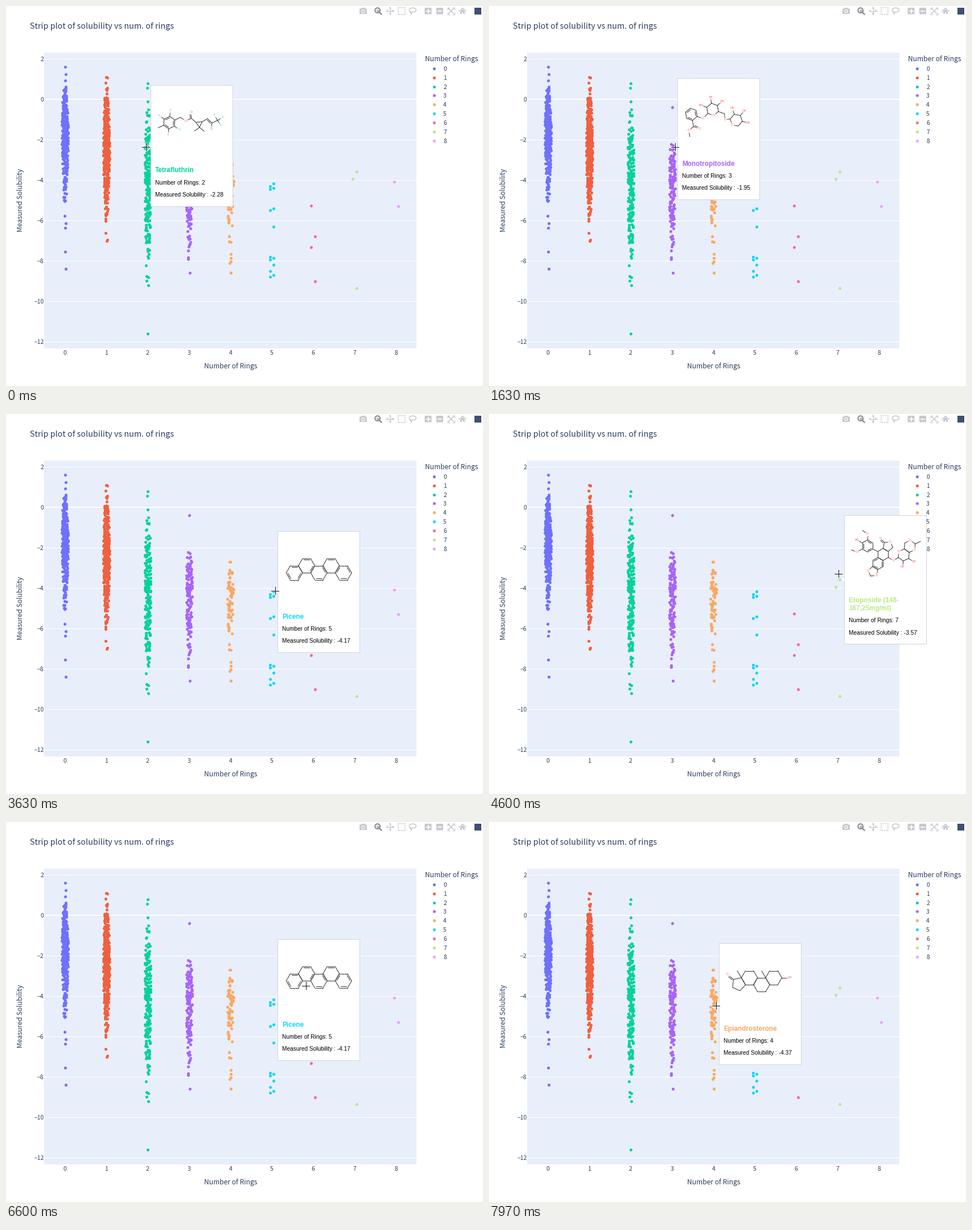
A matplotlib script for the animation above (8000 ms loop, 838x668 px).

```python
import numpy as np
import matplotlib.pyplot as plt
from matplotlib.animation import FuncAnimation
from matplotlib.collections import LineCollection
from matplotlib.patches import Circle, Ellipse, FancyBboxPatch, Polygon, Rectangle

W, H, DPI = 838, 668, 64
PT = 72 / DPI  # points per pixel
STEP, LOOP = 40, 8000

INK, PAPER = "#2a3f5f", "#e8eefa"
ICON, ICON_ON = "#c8cacd", "#868a92"
COLORS = ["#6f71fb", "#f0603f", "#06d29b", "#a964f6", "#f9a962",
          "#14d6f4", "#f46c96", "#bbe985", "#f49ff5"]
ATOM_INK = {"": "#2b2b2b", "O": "#f0524f", "OH": "#f0524f", "HO": "#f0524f",
            "F": "#4fc9c4", "Cl": "#5fc46a"}
SANS, ARIAL, SERIF = "Noto Sans CJK JP", "Liberation Sans", "Liberation Serif"

fig = plt.figure(figsize=(W / DPI, H / DPI), dpi=DPI, facecolor="white")
ax = fig.add_axes([0, 0, 1, 1])
ax.set(xlim=(0, W), ylim=(H, 0))
ax.axis("off")


def text(x, y, s, size, color=INK, family=SANS, ha="left", va="baseline", **kw):
    return ax.text(x, y, s, fontsize=size * PT, color=color, family=family,
                   ha=ha, va=va, **kw)


def line(xs, ys, color, lw, **kw):
    return ax.plot(xs, ys, color=color, lw=lw * PT, **kw)[0]


def dots(xs, ys, k):
    ax.plot(xs, ys, "o", ms=5.1 * PT, mew=0, color=COLORS[k])


def x_at(k):
    return 103.5 + 72.7 * k


def y_at(v):
    return 164 - 35.5 * v


# ---- chart ----------------------------------------------------------------

def draw_axes():
    ax.add_patch(Rectangle((67, 82), 654, 520, fc=PAPER, ec="none"))
    for v in range(2, -13, -2):
        line([67, 721], [y_at(v)] * 2, "white", 1 if v else 2)
        text(66.5, y_at(v) + 4, str(v).replace("-", "\u2212"), 10.4, ha="right")
    for k in range(9):
        y = 109.6 + 15.95 * k
        text(x_at(k), 613, str(k), 10.4, ha="center")
        text(771, y + 4, str(k), 10.4, ha="center")
        dots([751.5], [y], k)
    text(42, 40, "Strip plot of solubility vs num. of rings", 14.3)
    text(394.5, 637, "Number of Rings", 12, ha="center")
    text(736.5, 97, "Number of Rings", 12)
    text(25.5, 341, "Measured Solubility", 12, ha="center", va="center", rotation=90)


# Crowded columns: count, mode, spread above and below it, highest, lowest
STRIPS = [
    (330, -1.4, 1.0, 1.7, 1.6, -8.4),
    (390, -2.4, 1.4, 1.6, 1.1, -7.0),
    (210, -3.4, 1.4, 2.5, 0.8, -9.2),
    (140, -4.0, 1.1, 1.7, -0.4, -8.6),
    (72, -4.1, 0.7, 1.6, -2.7, -8.6),
]
# Thin columns, from the highest dot to the lowest
SINGLES = {
    5: (-4.17, -4.3, -4.4, -4.45, -5.4, -5.5, -6.3, -7.8, -7.85, -7.95,
        -8.2, -8.5, -8.7, -8.8),
    6: (-5.27, -6.8, -7.32, -9.02),
    7: (-3.57, -3.93, -9.34),
    8: (-4.08, -5.3),
}


def draw_points():
    rng = np.random.default_rng(11)
    for k, (n, mode, up, down, top, low) in enumerate(STRIPS):
        z = np.abs(rng.normal(size=2 * n))
        above = rng.random(2 * n) < up / (up + down)
        v = mode + np.where(above, up * z, -down * z)
        keep = (v < top) & (v > low)
        v, z = v[keep][:n], z[keep][:n]
        # the jitter is wide where the column is crowded
        reach = np.maximum(1.8, 5.6 * np.exp(-z**2 / 5))
        dots(x_at(k) + reach * rng.uniform(-1, 1, len(v)), y_at(v), k)
        dots([x_at(k), x_at(k) + 1], [y_at(top), y_at(low)], k)
    dots([x_at(2) + 0.5], [y_at(-11.6)], 2)
    for k, values in SINGLES.items():
        for i, v in enumerate(values):
            side = 1 if (i + k) % 2 else -1
            dots([x_at(k) + 3.4 * side], [y_at(v)], k)


def draw_toolbar():
    def box(x, y, w, h, r=1):
        ax.add_patch(FancyBboxPatch((x + r, y + r), w - 2 * r, h - 2 * r, fc=ICON,
                                    ec="none", boxstyle=f"round,pad={r}"))

    def plus(x, y, r, color, lw):
        line([x - r, x + r], [y, y], color, lw)
        line([x, x], [y - r, y + r], color, lw)

    # camera
    box(621, 4.5, 13, 9.5)
    box(624.5, 3, 6, 4)
    for r, color in ((3.2, "white"), (1.9, ICON)):
        ax.add_patch(Circle((627.5, 9.2), r, fc=color, ec="none"))
    # zoom
    ax.add_patch(Circle((652.7, 7.7), 4.4, fc="none", ec=ICON_ON, lw=2 * PT))
    line([656, 659.5], [11, 14.5], ICON_ON, 2.4)
    plus(652.7, 7.7, 2, ICON_ON, 1.2)
    # pan
    plus(674.5, 8.5, 6, ICON, 1.4)
    for d in np.array([(1, 0), (-1, 0), (0, 1), (0, -1)]):
        tip, side = (674.5, 8.5) + 7 * d, 2.6 * d[::-1]
        ax.add_patch(Polygon([tip, tip - 3 * d + side, tip - 3 * d - side], fc=ICON, ec="none"))
    # box and lasso select
    ax.add_patch(Rectangle((688.5, 2.5), 12, 12, fc="none", ec=ICON, lw=1.8 * PT,
                           ls=(0, (1.1, 0.9))))
    ax.add_patch(Ellipse((714.5, 7), 12, 7.5, fc="none", ec=ICON, lw=1.6 * PT))
    line([710.5, 710, 712.5, 711.5], [9.8, 12, 12.5, 15], ICON, 1.4)
    # zoom in, zoom out
    box(735.5, 3, 12, 11.5)
    box(756, 3, 12, 11.5)
    plus(741.5, 8.7, 3, "white", 1.8)
    line([759, 765], [8.7, 8.7], "white", 1.8)
    # autoscale
    for sx in (-1, 1):
        line([778, 786], [8.7 - 4 * sx, 8.7 + 4 * sx], ICON, 1.5)
        for sy in (-1, 1):
            cx, cy = 782 + 6 * sx, 8.7 + 6 * sy
            line([cx - 3 * sx, cx, cx], [cy, cy, cy - 3 * sy], ICON, 1.4)
    # home
    line([796, 802, 808], [9, 3.5, 9], ICON, 1.5)
    ax.add_patch(Polygon([(798, 9), (802, 5.5), (806, 9), (806, 14), (798, 14)],
                         fc=ICON, ec="none"))
    ax.add_patch(Rectangle((801, 10.5), 2, 3.5, fc="white", ec="none"))

    ax.add_patch(Rectangle((823, 3), 12, 12, fc="#3f4f75", ec="none"))


# ---- molecules ------------------------------------------------------------

def polar(r, deg):
    a = np.radians(deg)
    return np.stack([r * np.cos(a), r * np.sin(a)], axis=-1)


class Molecule:
    """Structure grown from regular rings and arms of one bond length."""

    def __init__(self, size):
        self.size = size
        self.segs, self.inks, self.labels = [], [], []

    def stroke(self, p, q, ink=""):
        self.segs.append([p, q])
        self.inks.append(ATOM_INK[ink])

    def link(self, p, q, a="", b=""):
        """Bond whose halves take the colours of atoms a and b."""
        mid, trim = (p + q) / 2, 0.32 * (q - p)
        self.stroke(p + trim * bool(a), mid, a)
        self.stroke(mid, q - trim * bool(b), b)

    def double(self, p, q, toward):
        """Second stroke of a double bond, on the side of `toward`."""
        d = q - p
        n = np.array([-d[1], d[0]]) / np.hypot(*d)
        n *= 2.2 * np.sign(n @ (toward - p))
        self.stroke(p + 0.15 * d + n, q - 0.15 * d + n)

    def tag(self, at, label):
        if label:
            self.labels.append((at, label))

    def polygon(self, v, oxygens=(), doubles=()):
        names = ["O" if k in oxygens else "" for k in range(len(v))]
        for k, p in enumerate(v):
            j = (k + 1) % len(v)
            self.link(p, v[j], names[k], names[j])
            self.tag(p, names[k])
            if k in doubles:
                self.double(p, v[j], v.mean(axis=0))
        return v

    def ring(self, x, y, turn=0, **kw):
        return self.polygon((x, y) + polar(self.size, turn + 60 * np.arange(6)), **kw)

    def fuse(self, v, k, n, **kw):
        """Regular n-gon grown outwards on edge k of ring v."""
        pts = [v[(k + 1) % len(v)], v[k]]
        step = pts[1] - pts[0]
        heading = np.degrees(np.arctan2(step[1], step[0]))
        while len(pts) < n:
            heading += 360 / n
            pts.append(pts[-1] + polar(self.size, heading))
        return self.polygon(np.array(pts), **kw)

    def arm(self, p, deg, label="", start="", double=False):
        q = p + polar(self.size, deg)
        self.link(p, q, start, label)
        self.tag(q, label)
        if double:
            self.double(p, p + 0.8 * (q - p), p + polar(1, deg - 90))
        return q

    def out(self, v, k, label="", **kw):
        dx, dy = v[k] - v.mean(axis=0)
        return self.arm(v[k], np.degrees(np.arctan2(dy, dx)), label, **kw)

    def artists(self):
        strokes = LineCollection(self.segs, colors=self.inks, linewidths=0.95 * PT,
                                 capstyle="round", zorder=12)
        ax.add_collection(strokes)
        return [strokes] + [text(x, y, s, 5, ATOM_INK[s], ARIAL, "center", "center",
                                 zorder=13) for (x, y), s in self.labels]


def tetrafluthrin():
    m = Molecule(10.9)
    v = m.ring(286.8, 205, -25, doubles=(0, 2, 4))
    for k in (1, 2, 4, 5):
        m.out(v, k, "F")
    m.out(v, 3)
    oxygen = m.arm(m.out(v, 0), 35, "O")
    acid = m.arm(oxygen, -25, start="O")
    m.arm(acid, -90, "O", double=True)
    a = m.arm(acid, 40)
    b = a + polar(m.size, -5)
    c = a + polar(m.size, 55)
    m.polygon(np.array([a, b, c]))
    m.arm(c, 145)
    m.arm(c, 40)
    d = m.arm(b, -30)
    e = m.arm(d, 45)
    m.double(d, e, a)
    m.arm(e, 95, "Cl")
    f = m.arm(e, -25)
    for deg in (-120, -30, 55):
        m.arm(f, deg, "F")
    return m


def monotropitoside():
    m = Molecule(10.9)
    v = m.ring(355.5, 190.5, 20, doubles=(1, 3, 5))
    s = m.ring(392.8, 181.8, 20, oxygens=(1,))
    u = m.ring(434.3, 200.7, 12, oxygens=(2,))
    m.link(m.out(v, 0, "O"), s[2], "O")
    m.link(m.arm(m.out(s, 0), 80, "O"), u[3], "O")
    m.out(s, 3, "HO")
    for ring, k in ((s, 4), (s, 5), (u, 4), (u, 5), (u, 0)):
        m.out(ring, k, "OH")
    ester = m.out(v, 1)
    m.arm(ester, 20, "O", double=True)
    m.arm(m.arm(ester, 140, "O"), 80, start="O")
    return m


def picene():
    m = Molecule(14.37)
    for k, doubles in enumerate([(0, 2, 4), (0, 4), (1, 5), (4,), (1, 3, 5)]):
        m.ring(506.6 + 1.5 * m.size * k, 266.7 if k % 2 else 279.2, doubles=doubles)
    return m


def etoposide():
    m = Molecule(10.6)
    v = m.ring(665, 232, 30, doubles=(0, 2, 4))
    m.out(v, 3, "HO")
    m.arm(m.out(v, 4, "O"), 215, start="O")
    m.arm(m.out(v, 2, "O"), 200, start="O")
    b = m.ring(692.3, 246.9, 30)
    m.link(v[0], b[3])
    m.fuse(m.fuse(b, 1, 6, doubles=(1, 3, 5)), 3, 5, oxygens=(2, 4))
    lactone = m.fuse(b, 4, 5, oxygens=(3,))
    m.out(lactone, 2, "O", double=True)
    s = m.ring(728.7, 247.8, 35, oxygens=(3,))
    m.link(m.out(b, 0, "O"), s[2], "O")
    m.out(s, 0, "OH")
    m.out(s, 1, "OH")
    m.out(m.fuse(s, 4, 6, oxygens=(3, 5)), 4)
    return m


def epiandrosterone():
    m = Molecule(14.2)
    c, b, a = (m.ring(457.6 + 1.5 * m.size * k, 286.1 if k == 1 else 273.8)
               for k in range(3))
    five = m.fuse(c, 2, 5)
    m.out(five, 4, "O", double=True)
    m.arm(c[3], 240)
    m.arm(b[5], 240)
    m.out(a, 0, "OH")
    return m


# ---- tooltips -------------------------------------------------------------

def panel(x, y, w, h):
    frame = Rectangle((x + 0.5, y + 0.5), w - 1, h - 1, fc="white", ec="#d3d5d8",
                      lw=PT, zorder=10)
    mid = y + h / 2
    caret = Polygon([(x + 1, mid - 4), (x - 3.5, mid), (x + 1, mid + 4)], fc="white",
                    ec="none", zorder=11)
    return [ax.add_patch(frame), ax.add_patch(caret)]


def card(dot_x, value, rings, name, molecule):
    """Loading note and full card for one dot of the chart."""
    dot_y = y_at(value)
    wait = panel(dot_x + 7, round(dot_y) - 25, 73, 25)
    wait.append(text(dot_x + 16.5, dot_y - 8, "Loading...", 13.6, "black", SERIF, zorder=12))

    rows = name.split("\n")
    h = 200 + 13.5 * len(rows)
    x, y = dot_x + 6, round(dot_y - h / 2)
    full = panel(x, y, 145, round(h))
    base = y + 154.5
    for row in rows:
        full.append(text(x + 9, base, row, 11.75, COLORS[rings], ARIAL,
                         weight="bold", zorder=12))
        base += 13.5
    base += 7.8
    for row in (f"Number of Rings: {rings}", f"Measured Solubility : {value}"):
        full.append(text(x + 9, base, row, 10.15, "black", ARIAL, zorder=12))
        base += 21.2
    return wait, full + molecule().artists()


draw_axes()
draw_points()
draw_toolbar()

tetra = card(247, -2.28, 2, "Tetrafluthrin", tetrafluthrin)
mono = card(324, -1.95, 3, "Monotropitoside", monotropitoside)
epi = card(397, -4.37, 4, "Epiandrosterone", epiandrosterone)
pic = card(470, -4.17, 5, "Picene", picene)
eto = card(617, -3.57, 7, "Etoposide (148-\n167,25mg/ml)", etoposide)
PANELS = [p for tip in (tetra, mono, epi, pic, eto) for p in tip]

# Pointer rests: arrival ms, departure ms, place, card under it
RESTS = [
    (-LOOP, 40, (245, 247), tetra),
    (440, 1640, (326, 247), mono),
    (2320, 2920, (398, 322), epi),
    (3320, 4160, (472, 310), pic),
    (4360, 5940, (613, 280), eto),
    (6160, 6380, (474, 308), pic),
    (6600, 6600, (526, 287), pic),
    (6740, 7060, (470, 319), pic),
    (7720, LOOP, (398, 322), epi),
]
LAG, LINGER = 200, 60

halo = [line([], [], "white", 2.8, zorder=20, alpha=0.75) for _ in range(2)]
cross = [line([], [], "#1c1c1c", 1.1, zorder=21) for _ in range(2)]


def pointer(t):
    for (_, t0, p, _), (t1, _, q, _) in zip(RESTS, RESTS[1:]):
        if t < t1:
            u = np.clip((t - t0) / (t1 - t0), 0, 1)
            return np.array(p) + np.subtract(q, p) * u * u * (3 - 2 * u)
    return np.array(RESTS[-1][2])


def panel_at(t):
    i = max(k for k, rest in enumerate(RESTS) if rest[0] <= t)
    arrive, leave, _, tip = RESTS[i]
    stays = i + 1 < len(RESTS) and RESTS[i + 1][3] is tip
    if t > leave + LINGER and not stays:
        return None
    came = RESTS[i - 1][3] is not tip
    return tip[0] if came and t < arrive + LAG else tip[1]


def draw(i):
    t = i * STEP
    shown = panel_at(t)
    for p in PANELS:
        for part in p:
            part.set_visible(p is shown)
    x, y = np.round(pointer(t)) + 0.5
    for bar_h, bar_v in (halo, cross):
        bar_h.set_data([x - 6.5, x + 6.5], [y, y])
        bar_v.set_data([x, x], [y - 6.5, y + 6.5])
    return halo + cross


anim = FuncAnimation(fig, draw, frames=LOOP // STEP, interval=STEP, repeat=True,
                     repeat_delay=0, init_func=lambda: draw(0))
plt.show()
```
